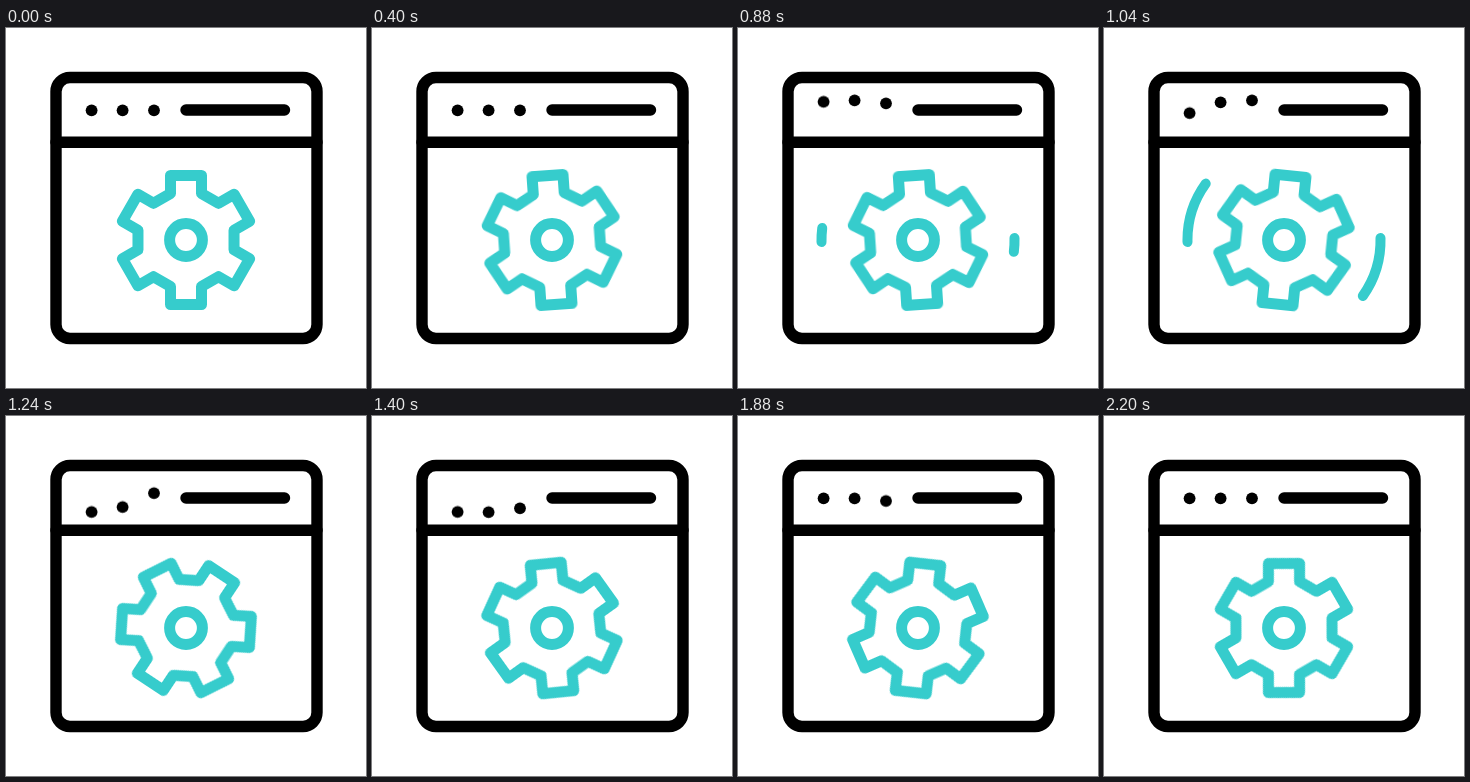
An HTML page for the animation above (2400 ms loop, 360x360 px).

```html
<!DOCTYPE html>
<html lang="en">
<head>
<meta charset="utf-8">
<title>Browser settings</title>
<style>
  html, body { margin: 0; width: 100%; height: 100%; overflow: hidden; background: #fff; }
  svg { display: block; width: 100vw; height: 100vh; }

  .line { fill: none; stroke: #000; stroke-width: 11.4; stroke-linecap: round; }
  .teal { fill: none; stroke: #36cccc; stroke-width: 11; stroke-linecap: round; stroke-linejoin: round; }
  .arc { stroke-width: 10; stroke-dasharray: 0 300; visibility: hidden; animation: sweep 2400ms linear infinite; }

  #gear { animation: turn 2400ms linear infinite; }
  .dot { animation: bob 2400ms cubic-bezier(.65, 0, .35, 1) infinite backwards; }
  .dot:nth-of-type(2) { animation-delay: 140ms; }
  .dot:nth-of-type(3) { animation-delay: 280ms; }

  /* One tooth per loop, with wind-up and overshoot */
  @keyframes turn {
    0% { transform: rotate(0); }
    10% { transform: rotate(0); animation-timing-function: cubic-bezier(.7, -.65, .3, 1.65); }
    91.67%, 100% { transform: rotate(60deg); }
  }
  @keyframes bob {
    0%, 16.67% { transform: translateY(0); }
    31.25% { transform: translateY(-10px); }
    55% { transform: translateY(14px); }
    73.33%, 100% { transform: translateY(0); }
  }
  /* pathLength is 100: draw from the tail, then erase from the tail */
  @keyframes sweep {
    0%, 35% { visibility: hidden; stroke-dasharray: 0 300; stroke-dashoffset: 0; }
    35.1% { visibility: visible; stroke-dasharray: 1 300; stroke-dashoffset: 0; }
    42.5%, 44.17% { visibility: visible; stroke-dasharray: 100 300; stroke-dashoffset: 0; }
    49.9% { visibility: visible; stroke-dasharray: 1 300; stroke-dashoffset: -99; }
    50%, 100% { visibility: hidden; stroke-dasharray: 0 300; stroke-dashoffset: -100; }
  }
</style>
</head>
<body>
<svg viewBox="0 0 360 360">
  <rect class="line" x="50" y="49.5" width="261" height="261" rx="14"/>
  <path class="line" d="M50 114.3H311M180 82H278.5"/>
  <g>
    <circle class="dot" cx="85.6" cy="82.3" r="5.9"/>
    <circle class="dot" cx="116.6" cy="82.3" r="5.9"/>
    <circle class="dot" cx="148" cy="82.3" r="5.9"/>
  </g>
  <g transform="translate(180 212)">
    <path class="teal arc" pathLength="100" d="M-96.5 2A96.5 96.5 0 0 1 -78.3 -56.4"/>
    <path class="teal arc" pathLength="100" d="M96.5 -2A96.5 96.5 0 0 1 78.8 56"/>
    <path id="gear" class="teal"/>
    <circle class="teal" r="16.4"/>
  </g>
</svg>
<script>
  const tooth = [[-15.5, -46.5], [-15.5, -64.5], [15.5, -64.5], [15.5, -46.5]];
  const points = [];
  for (let i = 0; i < 6; i++) {
    const c = Math.cos(i * Math.PI / 3), s = Math.sin(i * Math.PI / 3);
    for (const [x, y] of tooth) {
      points.push(`${(x * c - y * s).toFixed(2)} ${(x * s + y * c).toFixed(2)}`);
    }
  }
  document.getElementById('gear').setAttribute('d', `M${points.join('L')}Z`);
</script>
</body>
</html>
```
